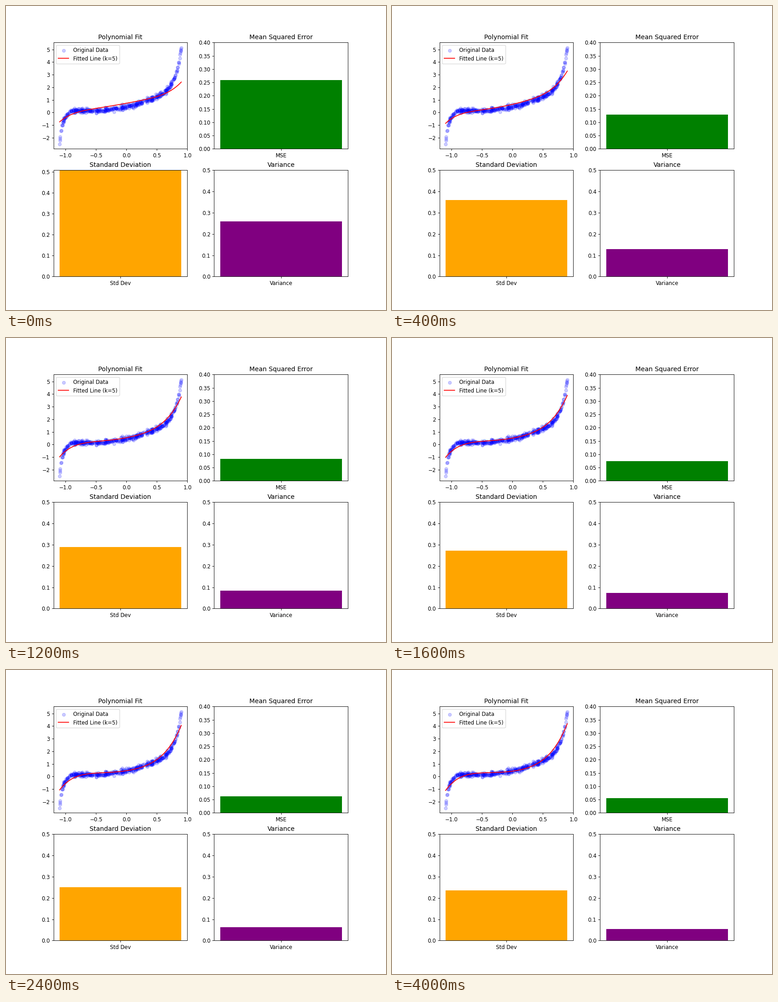
Recreate the animation shown at these times as a matplotlib script. Size 837 px wide and 669 px high, loop 4200 ms.

```python
import numpy as np
import matplotlib.pyplot as plt
from matplotlib.animation import FuncAnimation

plt.rcParams["font.family"] = "DejaVu Sans"

WIDTH, HEIGHT, DPI = 837, 669, 83.7
FRAMES, INTERVAL = 21, 200
DEGREE = 5
X_MIN, X_MAX = -1.1, 0.9


def trend(x):
    """Gentle parabola with a steep exponential tail at each end."""
    return (0.48 + 1.1 * x + 0.9 * x**2
            + 2.95 * np.exp(11 * (x - X_MAX))
            - 2.85 * np.exp(-17 * (x - X_MIN)))


rng = np.random.default_rng(7)
data_x = np.append(rng.uniform(X_MIN, X_MAX, 398), [X_MIN, X_MAX])
data_y = trend(data_x) + rng.normal(0, 0.1, data_x.size)
data_y[-2:] = trend(data_x[-2:])


def through_nodes(*values):
    """Coefficients of the polynomial through the given node values."""
    return np.polyfit([-1.1, -0.8, -0.5, 0.0, 0.5, 0.9], values, DEGREE)


# The fit settles to its limit as a slow and a fast component decay.
LIMIT = through_nodes(-1.12, 0.06, 0.30, 0.41, 1.32, 4.25)
SLOW = through_nodes(0.35, -0.18, -0.15, 0.33, 0.21, -1.17)
FAST = through_nodes(0.03, 0.15, 0.18, 0.0, -0.26, -0.66)

line_x = np.linspace(X_MIN, X_MAX, 300)


def fitted(step):
    coefficients = LIMIT + SLOW * np.exp(-0.15 * step) + FAST * np.exp(-step)
    return np.polyval(coefficients, line_x)


def squared_error(step):
    return (0.053 + 0.094 * np.exp(-0.19 * step)
            + 0.1115 * np.exp(-1.13 * step))


def bar_panel(ax, title, label, color, top):
    ax.set(title=title, xlim=(-0.44, 0.44), ylim=(0, top))
    return ax.bar([label], [0], color=color)[0]


# The tiny margin keeps the canvas from rounding down a pixel.
fig, axes = plt.subplots(
    2, 2, figsize=((WIDTH + 0.01) / DPI, (HEIGHT + 0.01) / DPI), dpi=DPI)
fit_ax, mse_ax, std_ax, var_ax = axes.flat

fit_ax.scatter(data_x, data_y, color="blue", alpha=0.2, label="Original Data")
line, = fit_ax.plot(line_x, fitted(0), color="red",
                    label=f"Fitted Line (k={DEGREE})")
fit_ax.set(title="Polynomial Fit", xlim=(-1.2, 1.0), ylim=(-2.88, 5.556))
fit_ax.legend(loc="upper left")

mse_bar = bar_panel(mse_ax, "Mean Squared Error", "MSE", "green", 0.4)
std_bar = bar_panel(std_ax, "Standard Deviation", "Std Dev", "orange", 0.5)
var_bar = bar_panel(var_ax, "Variance", "Variance", "purple", 0.5)
for ax in (mse_ax, std_ax, var_ax):
    ax.set_xlim(-0.44, 0.44)


def update(step):
    error = squared_error(step)
    deviation = np.sqrt(error)
    line.set_ydata(fitted(step))
    mse_bar.set_height(error)
    std_bar.set_height(deviation)
    var_bar.set_height(error)
    std_ax.set_ylim(0, max(0.5, deviation))
    return line, mse_bar, std_bar, var_bar


anim = FuncAnimation(fig, update, frames=FRAMES, interval=INTERVAL,
                     init_func=lambda: update(0), repeat=True,
                     repeat_delay=0, blit=False)
plt.show()
```
